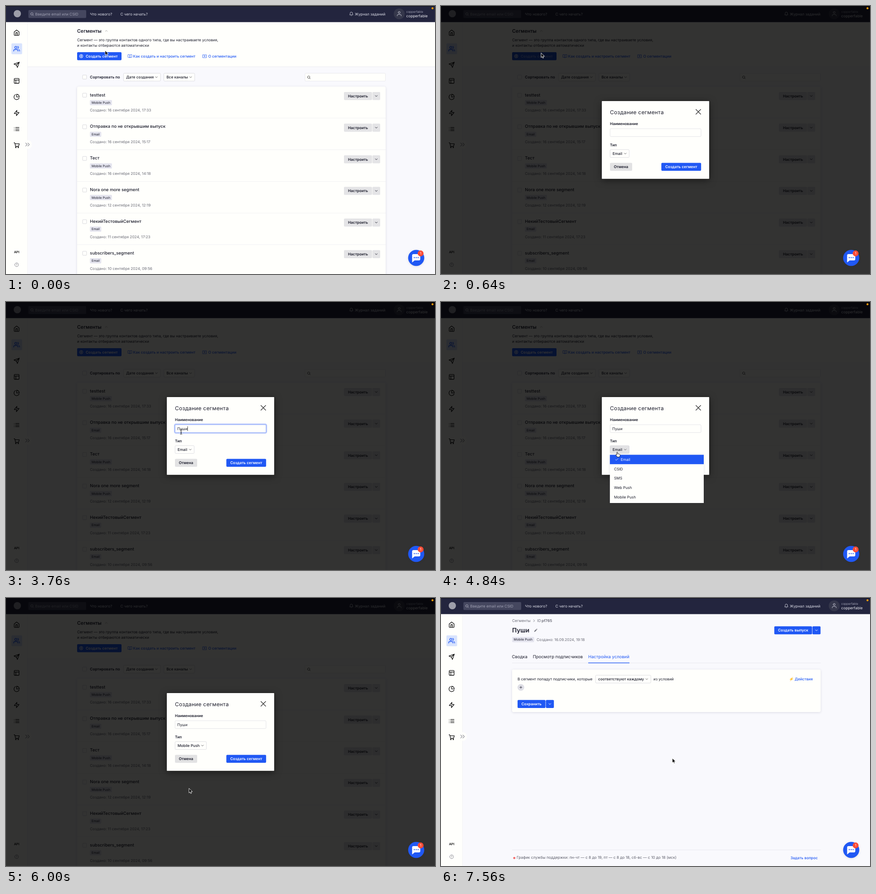
An HTML page for the animation above (8640 ms loop, 947 px wide and 592 px high).

```html
<!DOCTYPE html>
<html lang="ru">
<head>
<meta charset="utf-8">
<title>Сегменты</title>
<style>
  html, body { margin: 0; width: 100%; height: 100%; overflow: hidden; background: #f9f9fd; }
  svg { display: block; width: 947px; height: 592px; }
  text { font-family: Inter, sans-serif; dominant-baseline: central; text-rendering: geometricPrecision; white-space: pre; }
  .card { filter: drop-shadow(0 1px 2.5px rgba(30, 30, 70, .14)); }
  .modal { filter: drop-shadow(0 3px 8px rgba(0, 0, 0, .5)); }
</style>
</head>
<body>
<svg id="stage" viewBox="0 0 947 592"></svg>
<script>
const SCALE = 0.592, LOOP = 8640;
const INK = '#1b1c2b', GREY = '#6a6b76', BLUE = '#2058f4', BLUE_HOVER = '#1a49cf', WHITE = '#fffffc';

const ring = (x, y, r) => `M${x - r} ${y}a${r} ${r} 0 1 0 ${2 * r} 0a${r} ${r} 0 1 0 ${-2 * r} 0`;
const ICONS = {
  home: 'M3 9l9-7 9 7v11a2 2 0 0 1-2 2H5a2 2 0 0 1-2-2zM9 22V12h6v10',
  users: 'M17 21v-2a4 4 0 0 0-4-4H5a4 4 0 0 0-4 4v2M23 21v-2a4 4 0 0 0-3-3.87M16 3.13a4 4 0 0 1 0 7.75' + ring(9, 7, 4),
  send: 'M22 2L11 13M22 2l-7 20-4-9-9-4z',
  layout: 'M5 3h14a2 2 0 0 1 2 2v14a2 2 0 0 1-2 2H5a2 2 0 0 1-2-2V5a2 2 0 0 1 2-2zM3 9h18M9 21V9',
  pie: 'M21.2 15.9A10 10 0 1 1 8 2.8M22 12A10 10 0 0 0 12 2v10z',
  zap: 'M13 2L3 14h9l-1 8 10-12h-9z',
  list: 'M8 6h13M8 12h13M8 18h13M3 6h.01M3 12h.01M3 18h.01',
  cart: 'M2 3h3l3 13.5h11L22 7H6' + ring(9, 20.5, 1.3) + ring(18, 20.5, 1.3),
  bell: 'M18 8A6 6 0 0 0 6 8c0 7-3 9-3 9h18s-3-2-3-9M13.7 21a2 2 0 0 1-3.4 0',
  help: 'M9.1 9a3 3 0 0 1 5.8 1c0 2-3 3-3 3M12 17h.01' + ring(12, 12, 10),
  user: 'M20 21v-2a4 4 0 0 0-4-4H8a4 4 0 0 0-4 4v2' + ring(12, 7, 4),
  account: 'M6 18c2-4 10-4 12 0' + ring(12, 10, 3.5) + ring(12, 12, 10),
  search: 'M21 21l-5-5' + ring(11, 11, 7),
  book: 'M2 3h6a4 4 0 0 1 4 4v14a3 3 0 0 0-3-3H2zM22 3h-6a4 4 0 0 0-4 4v14a3 3 0 0 1 3-3h7z',
  video: 'M2 4h20v16H2zM10 9v6l5-3z',
  right: 'M9 18l6-6-6-6',
  rights: 'M13 18l6-6-6-6M5 18l6-6-6-6',
  down: 'M6 9l6 6 6-6',
  up: 'M6 15l6-6 6 6',
  check: 'M20 6L9 17l-5-5',
  cross: 'M3 3l18 18M21 3L3 21',
  plus: 'M12 5v14M5 12h14',
  pen: 'M2 22l1-5L14 6l4 4L7 21zM16 4l2-2 4 4-2 2z',
  bolt: 'M20 1L3 14l8 .5L5 23 22 9.5l-8-.5z'
};

const icon = (name, x, y, size, color = INK, width = 2, fill = 'none') =>
  `<path d="${ICONS[name]}" transform="translate(${x - size / 2} ${y - size / 2}) scale(${size / 24})" fill="${fill}" stroke="${color}" stroke-width="${width}" stroke-linecap="round" stroke-linejoin="round"/>`;
const rect = (x, y, w, h, fill, attrs = '') =>
  `<rect x="${x}" y="${y}" width="${w}" height="${h}" fill="${fill}" ${attrs}/>`;
const circle = (x, y, r, fill, attrs = '') => `<circle cx="${x}" cy="${y}" r="${r}" fill="${fill}" ${attrs}/>`;
const text = (x, y, str, { size = 14, color = INK, weight = 400, attrs = '' } = {}) =>
  `<text x="${x}" y="${y}" font-size="${size * SCALE}" fill="${color}" font-weight="${weight}" ${attrs}>${str}</text>`;
const MIDDLE = 'text-anchor="middle"';
const bold = (x, y, str, color = INK, attrs = '') => text(x, y, str, { color, weight: 600, attrs });
const medium = (x, y, str, color = INK, attrs = '') => text(x, y, str, { color, weight: 500, attrs });
const tag = (x, y, str) =>
  rect(x, y - 5.7, str === 'Email' ? 25 : 48.5, 11.4, '#e4e4ee', 'rx="1.5"') + text(x + 3.6, y, str, { size: 12 });
const checkbox = (x, y) => rect(x - 4.4, y - 4.4, 8.8, 8.8, WHITE, 'rx="1" stroke="#cfcfd6" stroke-width=".8"');
const box = (x, y, w, h, attrs = '') => rect(x, y, w, h, WHITE, `rx="2" stroke="#d6d6dc" stroke-width=".8" ${attrs}`);
const select = (x, y, w, str) => box(x, y - 8.7, w, 17.4) + medium(x + 5.8, y, str) + icon('down', x + w - 9, y, 9, '#555', 2.4);
const splitButton = (x, y, w, w2, str, fill, color) =>
  rect(x, y - 8.9, w, 17.8, fill, 'rx="2"') + rect(x + w + .8, y - 8.9, w2, 17.8, fill, 'rx="2"') +
  bold(x + w / 2, y, str, color, MIDDLE) + icon('down', x + w + .8 + w2 / 2, y, 9, color, 2.6);

const frame = () => {
  const side = ['home', 'users', 'send', 'layout', 'pie', 'zap', 'list', 'cart'];
  return rect(0, 0, 947, 592, '#f9f9fd') +
    rect(0, 35, 47.5, 557, WHITE) + rect(47.2, 35, .6, 557, '#ececf1') +
    rect(0, 0, 947, 35.6, '#23253e') + rect(0, 0, 947, .8, '#0b0b12') +
    circle(25, 17, 8, '#9d9ea9') +
    rect(49.5, 9, 127.5, 17.6, '#45475f', 'rx="2"') + icon('search', 57.5, 17.8, 9, '#b4b5c4', 2.4) +
    text(64.5, 17.8, 'Введите email или CSID', { color: '#9fa0b3' }) +
    text(185.5, 17.5, 'Что нового?', { color: '#dddee8' }) + text(252.5, 17.5, 'С чего начать?', { color: '#dddee8' }) +
    icon('bell', 762.3, 17.5, 10, '#dddee8') + text(770, 17.8, 'Журнал заданий', { color: '#dddee8' }) +
    circle(868, 17.3, 12, '#35374b') + icon('user', 868, 17, 13, '#c9cad6', 1.8) +
    text(883.5, 12.5, 'copperfable', { size: 11, color: '#a2a3b5' }) + text(883.5, 21.5, 'copperfable', { color: '#eeeef4' }) +
    rect(12, 82.6, 23.6, 24, '#d8e3fd', 'rx="2"') +
    side.map((name, i) => icon(name, 23.5, 59 + i * 35.48, 14.2, name === 'users' ? BLUE : '#111', 2.2)).join('') +
    bold(23.5, 543.5, 'API', '#111', `${MIDDLE} style="font-size:7.1px"`) + icon('help', 23.5, 571.5, 10, GREY, 1.8);
};

const collapse = () => circle(47.5, 306, 9.8, WHITE) + icon('rights', 47.5, 306, 14, GREY, 1.8);

const ROWS = [
  ['testtest', 'Mobile Push', '16 сентября 2024, 17:33'],
  ['Отправка по не открывшим выпуск', 'Email', '16 сентября 2024, 15:17'],
  ['Тест', 'Mobile Push', '16 сентября 2024, 14:18'],
  ['Nora one more segment', 'Mobile Push', '12 сентября 2024, 12:19'],
  ['НекийТестовыйСегмент', 'Email', '11 сентября 2024, 17:23'],
  ['subscribers_segment', 'Email', '10 сентября 2024, 09:56']
];

const row = ([name, type, date], i) => `<g transform="translate(0 ${i * 69.85})">` +
  (i ? rect(157, 177.5, 681, .7, '#ebebf0') : '') +
  checkbox(173.5, 197) + text(185.3, 197, name, { size: 16, weight: 500 }) + tag(185.3, 213.5, type) +
  text(185.3, 230.4, 'Создано: ' + date, { color: GREY }) +
  splitButton(746, 198.9, 62, 17.2, 'Настроить', '#e4e4e6', INK) + '</g>';

const listPage = () =>
  rect(47.8, 36, 899.2, 98, WHITE) + rect(47.8, 133.8, 899.2, .7, '#e6e6ec') +
  text(157, 55.5, 'Сегменты', { size: 18, weight: 600 }) + icon('up', 221.5, 55, 9, '#888') +
  text(157, 74.8, 'Сегмент — это группа контактов одного типа, где вы настраиваете условия,') +
  text(157, 86.6, 'и контакты отбираются автоматически') +
  rect(157, 101.9, 98, 17.8, BLUE, 'rx="2" id="create"') + icon('account', 166, 110.8, 9, '#fff', 2.6) +
  bold(176, 110.8, 'Создать сегмент', '#fff', 'id="createText"') +
  icon('book', 273.5, 111, 9.5, BLUE) + medium(280.6, 111, 'Как создать и настроить сегмент', BLUE) +
  icon('video', 438.5, 111, 9.5, BLUE) + medium(446.5, 111, 'О сегментации', BLUE) +
  checkbox(173.5, 157) + bold(185.3, 157, 'Сортировать по') +
  select(259.4, 157.2, 81.6, 'Дате создания') + select(348.4, 157.2, 68.2, 'Все каналы') +
  box(660, 148.5, 177.6, 17.4, 'stroke-opacity=".6"') + icon('search', 668.5, 157.5, 9, '#555', 2.6) +
  rect(157, 178, 681, 430, WHITE, 'rx="4" class="card"') + ROWS.map(row).join('');

const segmentPage = () =>
  text(157, 50.2, 'Сегменты', { color: GREY }) + icon('right', 205.5, 50.2, 9, GREY, 2.4) +
  text(212.6, 50.2, 'ID', { color: GREY }) + bold(222, 50.2, 'pf765', GREY) +
  text(157, 71.8, 'Пуши', { size: 23, weight: 600 }) + icon('pen', 209.3, 71.2, 8, GREY, .6, GREY) +
  tag(157, 91.8, 'Mobile Push') + text(211, 91.8, 'Создано: 16.09.2024, 19:18', { color: GREY }) +
  splitButton(735.7, 71.4, 83.3, 18, 'Создать выпуск', BLUE, '#fff') +
  text(156.5, 130, 'Сводка', { size: 16 }) + text(202.7, 130, 'Просмотр подписчиков', { size: 16 }) +
  text(325, 130, 'Настройка условий', { size: 16, color: BLUE }) +
  rect(157, 143.3, 681, .7, '#e3e3ea') + rect(325, 142.7, 91, 1.4, BLUE) +
  rect(157, 158, 681, 94, WHITE, 'rx="3" class="card"') +
  '<g id="conditions">' +
  text(169, 179.3, 'В сегмент попадут подписчики, которые') + select(341.2, 179.2, 122, 'соответствуют каждому') +
  text(469, 179.3, 'из условий') +
  icon('bolt', 773.4, 179.2, 9.5, '#ffb82e', .8, '#ffc42e') + medium(780.8, 179.3, 'Действия', BLUE) +
  circle(176.3, 197.4, 7.4, '#dfdfe6') + icon('plus', 176.3, 197.4, 8.5, INK, 2.2) +
  splitButton(169, 234.2, 61.6, 17.8, 'Сохранить', BLUE, '#fff') + '</g>' +
  rect(157, 556, 681, .7, '#e3e3ea') + circle(161.8, 574.3, 2.4, '#f26a6a') +
  text(167, 574, 'График службы поддержки: пн-чт — с 8 до 19, пт — с 8 до 18, сб-вс — с 10 до 18 (мск)', { size: 14.08, color: '#5b5c68' }) +
  medium(831.7, 574, 'Задать вопрос', BLUE, 'text-anchor="end"');

const OPTIONS = ['Email', 'CSID', 'SMS', 'Web Push', 'Mobile Push'];
const MENU_Y = 337.5, OPTION_H = 20.75;

const modal = () =>
  rect(355, 210, 237, 171.8, WHITE, 'rx="1" class="modal"') +
  text(373, 234.8, 'Создание сегмента', { size: 20, attrs: 'letter-spacing=".3"' }) + icon('cross', 568, 233.8, 14, '#333', 2.2) +
  bold(373, 259.8, 'Наименование') +
  rect(372, 269.8, 203.2, 19.8, 'none', 'id="focus" rx="3" stroke="#b9c9fc" stroke-width="2.4"') +
  box(373.2, 271, 200.8, 17.4, 'id="input"') + text(378, 279.8, '', { attrs: 'id="typed"' }) +
  rect(0, 274.5, .8, 10.5, '#111', 'id="caret"') +
  bold(373, 306.5, 'Тип') + box(373.2, 317.2, 42.2, 17.4, 'id="type"') + medium(378.8, 325.8, '', INK, 'id="typeText"') +
  `<g id="typeArrow">${icon('down', 0, 326, 9, '#555', 2.4)}</g>` +
  rect(373, 346.6, 49, 17.4, '#e2e2e3', 'rx="2"') + bold(397.4, 355.4, 'Отмена', INK, MIDDLE) +
  rect(486.4, 346.6, 87.8, 17.4, BLUE, 'rx="2" id="submit"') +
  rect(486.4, 346.6, 87.8, 17.4, 'url(#stripes)', 'rx="2" id="busy"') +
  bold(530.3, 355.4, 'Создать сегмент', '#fff', MIDDLE) +
  '<g id="menu">' + rect(372.8, MENU_Y, 207.2, 106.5, WHITE, 'class="card"') +
  rect(372.8, MENU_Y, 207.2, OPTION_H, BLUE, 'id="mark"') +
  `<g id="check">${icon('check', 388, 348, 8.5, 'currentColor', 2.2)}</g>` +
  OPTIONS.map((o, i) => text(i ? 382 : 396.8, MENU_Y + (i + .5) * OPTION_H, o, { attrs: `id="option${i}"` })).join('') + '</g>';

const chat = () => circle(905.5, 556.5, 17.8, BLUE, 'class="card"') +
  '<path d="M899.5 548h12a3 3 0 0 1 3 3v8a3 3 0 0 1-3 3h-9.5l-5.5 4.5v-15.5a3 3 0 0 1 3-3z" fill="#fff"/>' +
  [901.3, 905.5, 909.7].map(x => circle(x, 555.8, 1.2, BLUE)).join('') +
  circle(915.2, 546.5, 6.5, '#fb4b35') + text(915.2, 546.6, '1', { size: 13, color: '#fff', attrs: MIDDLE }) +
  circle(941.5, 5, 2.2, '#ff9a0a');

const cursors = () => '<g id="cursor" stroke-linejoin="round" stroke-linecap="round">' +
  '<path id="arrow" d="M0 0V9.8L2.3 7.7 3.8 11.2 5.5 10.5 4 7.1H7.1Z" fill="#000" stroke="#fff" stroke-width=".9"/>' +
  '<path id="hand" d="M-1 6V1a1 1 0 0 1 2 0V4.3c1-.8 1.9-.4 2 .3.9-.5 1.7-.1 1.8.5.9-.4 1.6.1 1.6.9 0 2-.6 3.2-1.2 4.8H0C-.8 9-2.5 7.8-3.2 6.2c-.3-1 1-1.5 2.2-.2z" fill="#fff" stroke="#000" stroke-width=".8"/>' +
  '<path id="ibeam" d="M-2-5Q0-5 0-4Q0-5 2-5M0-4V4M-2 5Q0 5 0 4Q0 5 2 5M-1 .8H1" fill="none" stroke="#111" stroke-width=".9"/></g>';

document.getElementById('stage').innerHTML =
  `<defs><pattern id="stripes" width="16.76" height="16.76" patternUnits="userSpaceOnUse">${rect(0, 0, 8.38, 16.76, '#fff', 'opacity=".45"')}</pattern></defs>` +
  frame() + `<g id="list">${listPage()}</g><g id="segment">${segmentPage()}</g>` + collapse() +
  rect(0, 0, 947, 592, '#000', 'id="dim"') + chat() + `<g id="modal">${modal()}</g>` + cursors();

const el = Object.fromEntries([...document.querySelectorAll('[id]')].map(e => [e.id, e]));
const show = (id, on) => { el[id].style.display = on ? '' : 'none'; };
const set = (id, attr, value) => el[id].setAttribute(attr, value);
const ramp = (t, a, b) => Math.min(1, Math.max(0, (t - a) / (b - a)));
const smooth = k => k * k * (3 - 2 * k);

// Pointer moves: start, end, target x, target y
const MOVES = [[80, 320, 221, 104], [1080, 1680, 385.8, 274], [3600, 4120, 389, 331.5], [4840, 5640, 404, 420.8], [6000, 6500, 510.7, 354.3]];
const pointer = t => MOVES.reduce(([x, y], [a, b, tx, ty]) => {
  const k = smooth(ramp(t, a, b));
  return [x + (tx - x) * k, y + (ty - y) * k];
}, [218.8, 98.6]);
const KEYS = [2880, 3040, 3160, 3360];

function render(t) {
  const [x, y] = pointer(t);
  const over = (left, top, w, h) => x >= left && x <= left + w && y >= top && y <= top + h;
  const modalOpen = t >= 600 && t < 7320, menuOpen = t >= 4240 && t < 5760, busy = t >= 6760;
  const focused = t >= 1760 && t < 4200, chosen = t >= 5760;

  show('list', t < 7320);
  show('segment', t >= 7320);
  show('conditions', t >= 7560);
  show('modal', modalOpen);
  set('dim', 'opacity', modalOpen ? .8 * ramp(t, 560, 640) : 0);

  set('create', 'fill', t > 160 && t < 720 ? BLUE_HOVER : BLUE);
  set('createText', 'opacity', t >= 600 ? .45 + .55 * ramp(t, 650, 760) : 1);

  const count = KEYS.filter(k => t >= k).length;
  el.typed.textContent = 'Пуши'.slice(0, count);
  const lastKey = count ? KEYS[count - 1] : 1760;
  show('focus', focused);
  set('input', 'stroke', focused ? '#7c9af8' : '#dedee2');
  show('caret', focused && Math.floor((t - lastKey) / 520) % 2 === 0);
  set('caret', 'x', 378 + (count ? el.typed.getComputedTextLength() : 0));

  const overType = !chosen && t > 3600 && over(373, 317, 42, 17.5);
  const typeWidth = chosen ? 69.2 : 42.2;
  el.typeText.textContent = chosen ? 'Mobile Push' : 'Email';
  set('type', 'width', typeWidth);
  set('type', 'fill', overType || menuOpen ? '#e2e2e4' : WHITE);
  set('typeArrow', 'transform', `translate(${373.2 + typeWidth - 8.7} 0)`);

  show('menu', menuOpen);
  const active = Math.min(4, Math.max(0, Math.floor((y - MENU_Y) / OPTION_H)));
  set('mark', 'y', MENU_Y + active * OPTION_H);
  OPTIONS.forEach((_, i) => set('option' + i, 'fill', i === active ? '#fff' : INK));
  el.check.style.color = active ? INK : '#fff';

  const overSubmit = modalOpen && t > 6000 && over(486.4, 346.6, 87.8, 17.4);
  set('submit', 'fill', overSubmit && !busy ? BLUE_HOVER : BLUE);
  show('busy', busy);
  set('stripes', 'patternTransform', `translate(${486 - (t - 6760) * .0237} 347) rotate(-45)`);

  const hidden = (t >= 2880 && t < 3600) || (busy && modalOpen);
  const kind = modalOpen && over(373, 271, 201, 17.5) ? 'ibeam'
    : menuOpen || overType || overSubmit || (t < 600 && over(157, 102, 98, 17.6)) ? 'hand' : 'arrow';
  for (const name of ['arrow', 'hand', 'ibeam']) show(name, !hidden && name === kind);
  set('cursor', 'transform', `translate(${x} ${y})`);
}

function tick() {
  render(performance.now() % LOOP);
  requestAnimationFrame(tick);
}
tick();
</script>
</body>
</html>
```
